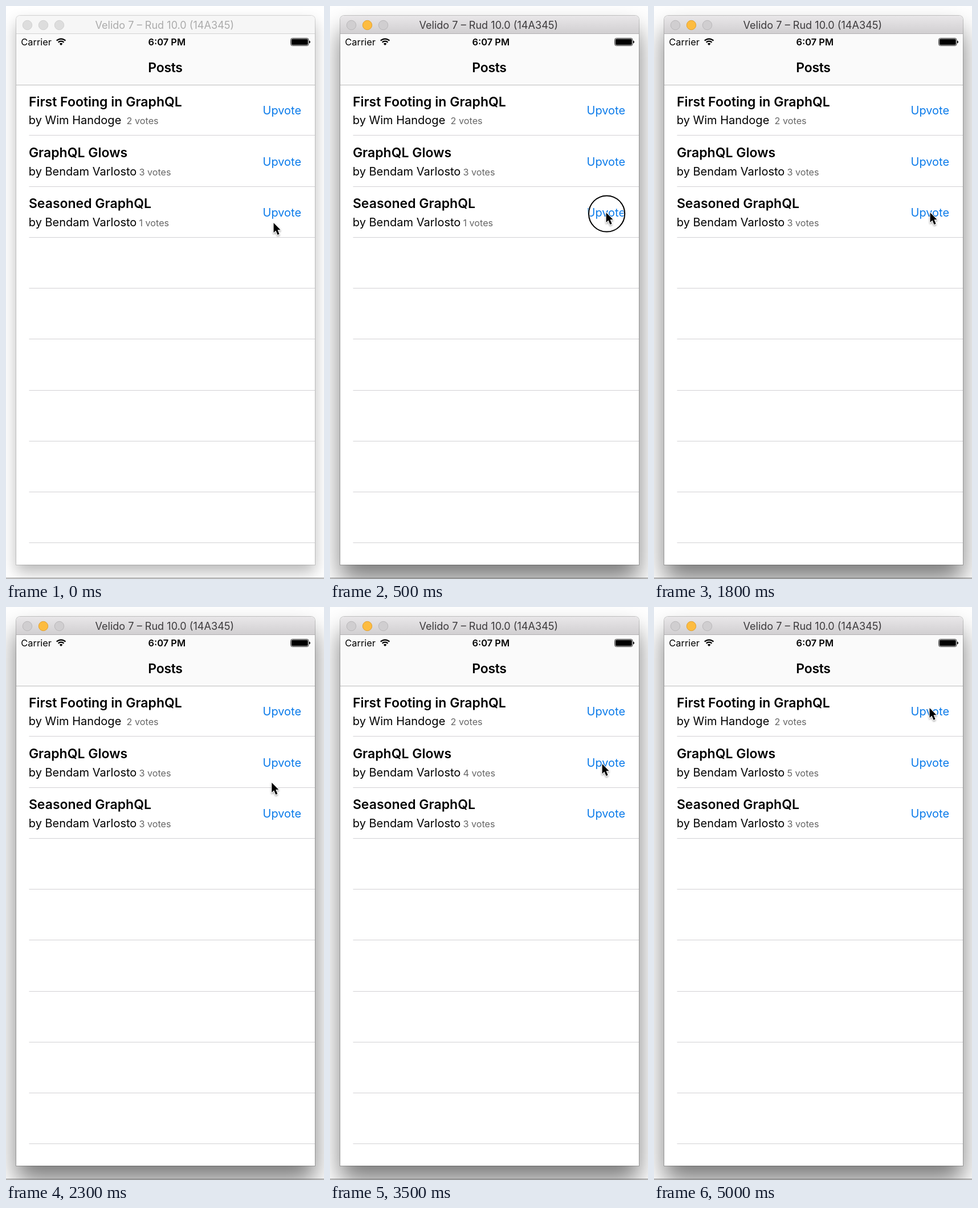
Write an HTML page that moves like this. It is 558x1004 px and loops after 5100 ms.

```html
<!DOCTYPE html>
<html lang="en">
<head>
<meta charset="utf-8">
<title>Posts</title>
<style>
  html, body { margin: 0; width: 100%; height: 100%; overflow: hidden; background: #fff; }
  #stage { position: relative; width: 558px; height: 1004px; overflow: hidden; background: #fff; }
  #shadow {
    position: absolute; left: 18px; top: 17px; width: 524px; height: 962px;
    border-radius: 7px 7px 0 0;
    box-shadow: 0 0 0 1px rgba(0,0,0,.15), 0 13px 27px rgba(0,0,0,.28);
  }
  .active #shadow { box-shadow: 0 0 0 1px rgba(0,0,0,.22), 0 26px 43px rgba(0,0,0,.52); }
  svg { position: absolute; left: 0; top: 0; font-family: Inter, "Open Sans", sans-serif; }
  text { white-space: pre; }
  .mid { text-anchor: middle; }
  .semi { font-weight: 600; }
  .title { font-size: 23px; }
  .author { font-size: 20px; }
  .votes { font-size: 16.2px; fill: #666; }
  .upvote { font-size: 20px; fill: #0b7bea; text-anchor: middle; }
  .status { font-size: 16.4px; }
  .caption { font-size: 18.1px; fill: #ababab; }
  .active .caption { fill: #3d3b3d; }
  .bar { fill: #f6f6f6; }
  .active .bar { fill: url(#chrome); }
  .barline { fill: #d3d3d3; }
  .active .barline { fill: #b3b1b3; }
  .light { fill: #dddddd; stroke: #d0d0d0; }
  .active .light { fill: #d0ced0; stroke: #b9b7b9; }
  .active .amber { fill: #fdbc40; stroke: #e0a033; }
</style>
</head>
<body>
<div id="stage">
  <div id="shadow"></div>
  <svg width="558" height="1004" viewBox="0 0 558 1004">
    <defs>
      <linearGradient id="chrome" x2="0" y2="1">
        <stop stop-color="#e9e7e9"/><stop offset="1" stop-color="#d1cfd1"/>
      </linearGradient>
      <filter id="soft" x="-50%" y="-50%" width="200%" height="200%">
        <feDropShadow dx="0" dy="1.8" stdDeviation="1.4" flood-opacity=".4"/>
      </filter>
    </defs>

    <path fill="#fff" d="M18 979V24a7 7 0 0 1 7-7H535a7 7 0 0 1 7 7V979Z"/>
    <path class="bar" d="M18 48V24a7 7 0 0 1 7-7H535a7 7 0 0 1 7 7V48Z"/>
    <rect class="barline" x="18" y="48" width="524" height="1"/>
    <circle class="light" cx="37.5" cy="33.5" r="8.2"/>
    <circle class="light amber" cx="65.5" cy="33.5" r="8.2"/>
    <circle class="light" cx="93.5" cy="33.5" r="8.2"/>
    <text class="caption mid" x="278.3" y="40.3">Velido 7 – Rud 10.0 (14A345)</text>

    <rect x="18" y="49" width="524" height="89" fill="#fafafa"/>
    <rect x="18" y="138" width="524" height="1" fill="#bcbcbc"/>
    <text class="status" x="26.3" y="69">Carrier</text>
    <g fill="none" stroke="#000" stroke-width="2.3">
      <path d="M88.8 60.8a11 11 0 0 1 15.6 0M91.7 63.7a6.9 6.9 0 0 1 9.8 0"/>
      <path fill="#000" stroke="none" d="M96.6 69l-2.7-2.8a3.8 3.8 0 0 1 5.4 0Z"/>
    </g>
    <text class="status semi mid" x="282.3" y="69">6:07 PM</text>
    <rect x="499.5" y="56.5" width="31.5" height="13" rx="3" fill="none" stroke="#000" stroke-width=".8"/>
    <rect x="500.8" y="57.8" width="28.9" height="10.4" rx="1.8"/>
    <path d="M532 60.6q2 .7 2 2.4t-2 2.4Z"/>
    <text class="title semi mid" x="279.5" y="115.7" letter-spacing="-.3">Posts</text>

    <g id="list"></g>
    <rect y="1002" width="558" height="1" fill="#6b6b6b"/>

    <g id="ring" fill="none">
      <circle r="31.6" stroke="#fff" stroke-width="4" stroke-opacity=".75"/>
      <circle r="31.6" stroke="#000" stroke-width="2"/>
    </g>
    <g id="pointer" filter="url(#soft)">
      <path d="M0 0V17.2L3.8 13.5 7 20.9 10 19.6 6.9 12.2H12Z"
        stroke="#fff" stroke-width="1.9" stroke-linejoin="round" paint-order="stroke"/>
    </g>
  </svg>
</div>
<script>
const LOOP = 5100, STEP = 100, ROW = 89.25, LINES = 9, VOTE_DELAY = 200;
const $ = id => document.getElementById(id);

const posts = [
  { title: "First Footing in GraphQL", author: "Wim Handoge", votesX: 211.6, votes: 2 },
  { title: "GraphQL Glows", author: "Bendam Varlosto", votesX: 233.4, votes: 3 },
  { title: "Seasoned GraphQL", author: "Bendam Varlosto", votesX: 233.4, votes: 1 }
];

const clicks = [
  { row: 2, down: 500, up: 600 },
  { row: 2, down: 1200, up: 1400 },
  { row: 1, down: 3100, up: 3300 },
  { row: 1, down: 3700, up: 3900 }
];

// The pointer rests at home, then glides to one button after another;
// bow pushes the middle of a glide sideways.
const home = { x: 470, y: 380 };
const glides = [
  { start: 0, end: 500, x: 485, y: 362, bow: 0 },
  { start: 2000, end: 2700, x: 478, y: 275, bow: -15 },
  { start: 4100, end: 4800, x: 484, y: 177, bow: 0 }
];

const label = (cls, x, y, text) => `<text class="${cls}" x="${x}" y="${y}">${text}</text>`;

function buildList() {
  let markup = "";
  for (let i = 0; i < LINES; i++) {
    markup += `<rect x="40.5" y="${Math.round(226.3 + i * ROW)}" width="501.5" height="1" fill="#d2d1d4"/>`;
  }
  posts.forEach((p, i) => {
    const y = i * ROW;
    markup += label("title semi", 39.9, 175.7 + y, p.title)
      + label("author", 39.8, 207.3 + y, "by " + p.author)
      + label("votes", p.votesX, 207.3 + y, "")
      + label("upvote", 484.3, 190.3 + y, "Upvote");
  });
  $("list").innerHTML = markup;
}

function pointerAt(t) {
  let { x, y } = home;
  for (const g of glides) {
    const p = Math.min(1, Math.max(0, (t - g.start) / (g.end - g.start)));
    const e = Math.sin(p * Math.PI / 2);
    x += (g.x - x) * e + g.bow * Math.sin(e * Math.PI);
    y += (g.y - y) * e;
  }
  return { x, y };
}

const votesAt = (row, t) =>
  posts[row].votes + clicks.filter(c => c.row === row && t >= c.down + VOTE_DELAY).length;

function draw(t) {
  const { x, y } = pointerAt(t);
  const held = clicks.some(c => t >= c.down && t < c.up);
  $("stage").classList.toggle("active", t >= clicks[0].down);
  $("pointer").setAttribute("transform", `translate(${x - .4} ${y})`);
  $("ring").setAttribute("transform", `translate(${x + .6} ${y + 2})`);
  $("ring").style.display = held ? "" : "none";
  counters.forEach((node, row) => node.textContent = votesAt(row, t) + " votes");
}

function tick() {
  draw(Math.floor(performance.now() % LOOP / STEP) * STEP);
  requestAnimationFrame(tick);
}

buildList();
const counters = document.querySelectorAll(".votes");
tick();
</script>
</body>
</html>
```
